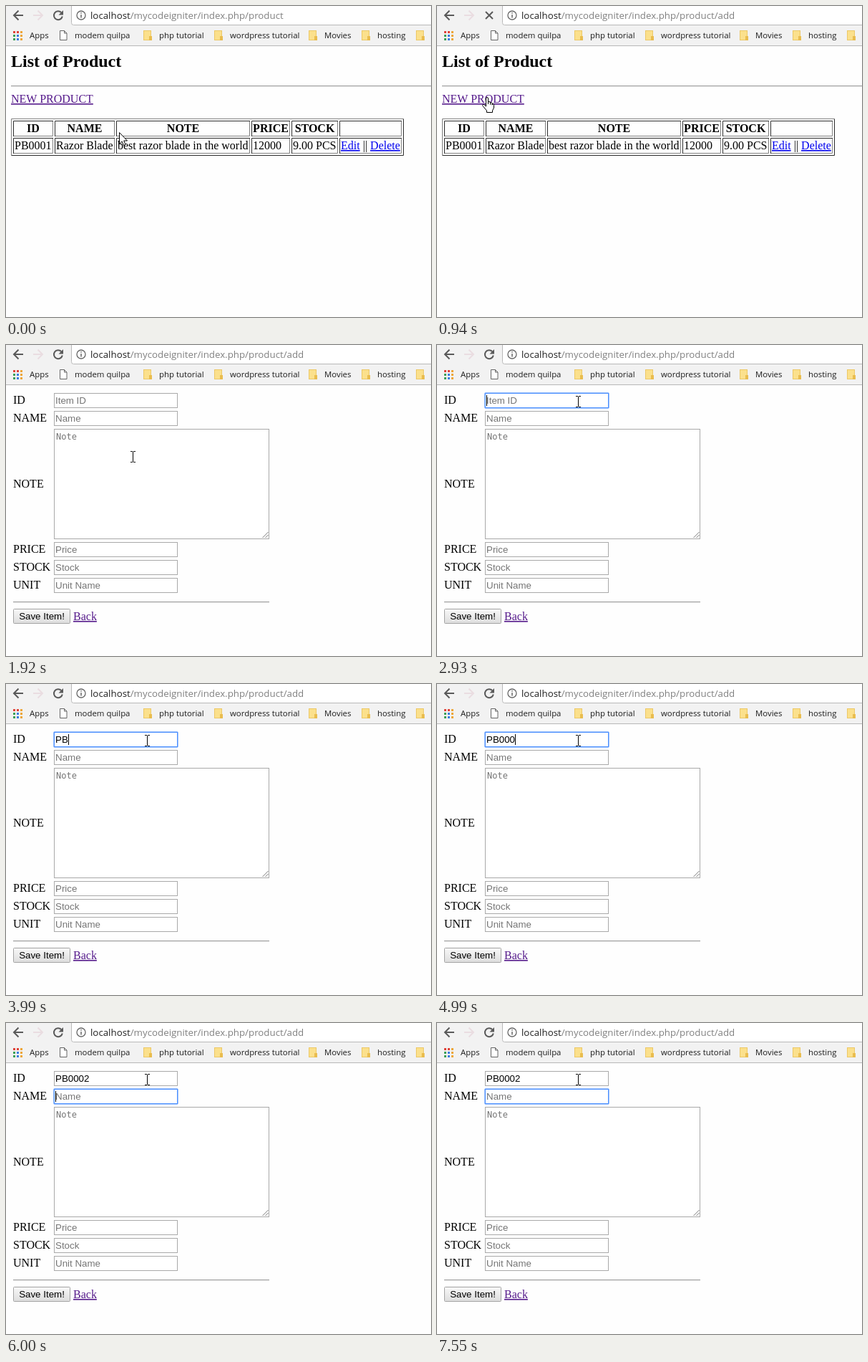
An HTML page that plays this animation: 594 by 434 pixels, repeating every 8000 ms.

```html
<!DOCTYPE html>
<html lang="en">
<head>
<meta charset="utf-8">
<title>Product list</title>
<style>
  html, body { margin: 0; width: 100%; height: 100%; overflow: hidden; background: #fefefe; }
  svg { display: block; width: 594px; height: 434px; }
  text { white-space: pre; }
  .ui { font: 11.4px "Open Sans", "Noto Sans", sans-serif; fill: #1c1c1c; }
  .url { font-size: 13.3px; fill: #222; }
  .path { fill: #808080; }
  .page { font: 16px "Liberation Serif", "Times New Roman", serif; fill: #000; }
  .head { font-weight: bold; text-anchor: middle; }
  .title { font-size: 24px; font-weight: bold; }
  .field { font: 13.333px "Liberation Sans", Arial, sans-serif; fill: #000; }
  .hint { fill: #757575; }
  .mono { font: 12px "DejaVu Sans Mono", monospace; }
  .link { fill: #00e; text-decoration: underline; }
  .seen { fill: #551a8b; text-decoration: underline; }
  .icon { fill: none; stroke: #5a5a5a; stroke-width: 2; }
</style>
</head>
<body>
<svg id="stage" viewBox="0 0 594 434">
  <rect width="594" height="434" fill="#fefefe"/>
  <g id="browser">
    <rect width="594" height="55" fill="#f2f2f2"/>
    <rect x="91.5" y="-4.5" width="520" height="31" rx="3" fill="#fff" stroke="#b9b9b9"/>
    <rect y="55" width="594" height="1" fill="#b8b8b8"/>
    <path class="icon" d="M24 13H11.5M17.5 6.5L11 13l6.5 6.5"/>
    <path class="icon" style="stroke:#eadde1" d="M38 13H50.5M44.500 6.500L51 13l-6.500 6.500"/>
    <g id="reload">
      <path class="icon" d="M77.300 9A6 6 0 1 0 78.800 14.500"/>
      <path d="M80 6v6.500h-6.500z" fill="#5a5a5a"/>
    </g>
    <path id="stop" class="icon" d="M68 8l10 10M78 8L68 18"/>
    <circle cx="105" cy="13" r="6" fill="none" stroke="#666" stroke-width="1.3"/>
    <path d="M105 12v4.500M105 9v1.600" stroke="#666" stroke-width="1.500"/>
    <text class="ui url" x="118" y="18">localhost<tspan id="path" class="path"></tspan></text>
    <path d="M75.500 34.500h6l3.500 3.500v9.500h-9.500zM81.500 34.500v3.500h3.500" fill="#fff" stroke="#666"/>
  </g>
  <g id="list" class="page"></g>
  <g id="form" class="page"></g>
  <g id="cursors" stroke="#000" fill="#fff">
    <path id="arrow" d="M.5.6V16.500L4.100 13l2.500 5.500 2.500-1.100L6.700 12h4.800z"/>
    <path id="hand" d="M5.500 13V2Q5.500.5 7 .5T8.500 2V10 7.500q0-1.100 1.500-1t1.500 1.500v2.500-2q0-1 1.300-.9t1.300 1.500v2-1q0-.7 1-.6 1.400.2 1.400 1.700V15l-2 4v2.500h-8V19L1 12.500q-.9-1.500.3-2.100 1.300-.5 2.800 1.300z"/>
    <path id="beam" fill="none" d="M0 .5h3M4 .5h3M3.500 1v14M0 15.500h3M4 15.500h3"/>
  </g>
</svg>
<script>
const $ = id => document.getElementById(id);
const LOOP = 8000;

const rect = (x, y, w, h, fill) =>
  `<rect x="${x}" y="${y}" width="${w}" height="${h}" fill="${fill}"/>`;
const frame = (x, y, w, h, fill, stroke) =>
  `<rect x="${x + .5}" y="${y + .5}" width="${w - 1}" height="${h - 1}" fill="${fill}" stroke="${stroke}"/>`;
const text = (x, y, str, cls = "") => `<text x="${x}" y="${y}" class="${cls}">${str}</text>`;
const add = (id, markup) => $(id).insertAdjacentHTML("beforeend", markup);
const show = (id, on) => $(id).setAttribute("visibility", on ? "visible" : "hidden");

// A box whose top/left and bottom/right edges differ in shade
function bevel(x, y, w, h, lit, shade) {
  const r = x + w - .5, b = y + h - .5;
  return `<g fill="none"><path stroke="${shade}" d="M${x} ${b}H${r}V${y}"/>` +
    `<path stroke="${lit}" d="M${x + .5} ${y + h}V${y + .5}H${x + w}"/></g>`;
}

const rule = (x, y, w) => rect(x, y, w, 1, "#9a9a9a") + rect(x, y + 1, w, 1, "#eee");

function drawBookmarks() {
  const dots = ["#e0433a", "#e0433a", "#eda63a", "#3c9f56", "#3d7de0", "#eda63a", "#3c9f56", "#3d7de0", "#eda63a"];
  dots.forEach((c, i) => add("browser", rect(10 + i % 3 * 5, 35 + Math.floor(i / 3) * 5, 3, 3, c)));
  add("browser", text(33, 45, "Apps", "ui") + text(96, 45, "modem quilpa", "ui"));
  const folders = [[192, "php tutorial"], [291, "wordpress tutorial"], [423, "Movies"], [497, "hosting"], [573, ""]];
  for (const [x, name] of folders) {
    add("browser", frame(x, 34, 11, 14, "#fbe08c", "#ecc867") +
      rect(x + 8, 42, 4, 6, "#e9bd4f") + text(x + 22, 45, name, "ui"));
  }
}

function drawList() {
  const dark = "#2c2c2c", gray = "#808080";
  add("list", text(7, 85, "List of Product", "title") + rule(7, 111, 587) +
    text(7, 135, "NEW PRODUCT", "seen") + bevel(7, 157, 549, 52, gray, dark));
  const columns = [
    [10, 56, "ID", "PB0001"],
    [68, 84, "NAME", "Razor Blade"],
    [154, 187, "NOTE", "best razor blade in the world"],
    [343, 54, "PRICE", "12000"],
    [399, 65, "STOCK", "9.00 PCS"],
    [466, 87, "", '<tspan class="link">Edit</tspan> || <tspan class="link">Delete</tspan>']
  ];
  for (const [x, w, head, value] of columns) {
    add("list", bevel(x, 160, w, 22, dark, gray) + bevel(x, 184, w, 22, dark, gray) +
      text(x + w / 2, 176, head, "head") + text(x + 2, 200, value));
  }
}

function drawForm() {
  const rows = [[67, "ID", "Item ID"], [92, "NAME", "Name"], [275, "PRICE", "Price"],
    [300, "STOCK", "Stock"], [325, "UNIT", "Unit Name"]];
  for (const [y, label, hint] of rows) {
    add("form", text(10, y + 15, label) + frame(67, y, 173, 21, "#fff", "#a9a9a9") +
      `<text id="in${label}" x="69" y="${y + 15}" class="field hint">${hint}</text>`);
  }
  add("form", text(10, 199, "NOTE") + frame(67, 117, 301, 154, "#fff", "#a9a9a9") +
    text(70, 132, "Note", "mono hint") +
    '<path d="M358.500 269l8-8M362.500 269l4-4" stroke="#777" fill="none"/>' + rule(10, 358, 358) +
    '<linearGradient id="face" x2="0" y2="1"><stop stop-color="#f8f8f8"/><stop offset="1" stop-color="#ddd"/></linearGradient>' +
    '<rect x="10.500" y="368.500" width="79" height="20" rx="1" fill="url(#face)" stroke="#a3a3a3"/>' +
    '<text x="50" y="383" class="field" text-anchor="middle">Save Item!</text>' +
    text(94, 384, "Back", "seen") +
    '<g id="focus" fill="none" stroke="#4d90fe"><rect x="66.500" y="66.500" width="174" height="22" rx="1.500" opacity=".55"/>' +
    '<rect x="67.500" y="67.500" width="172" height="20"/></g>' +
    '<rect id="caret" width="1" height="15"/>');
}

// Each step overrides part of the state from its start time on
const steps = [
  { at: 0, page: "list", route: "", cursor: ["arrow", 158, 176], loading: false, focus: 0, caret: 0, id: "" },
  { at: 500, cursor: ["hand", 59, 123] },
  { at: 940, cursor: ["hand", 63, 127], route: "/add", loading: true },
  { at: 1440, cursor: ["hand", 165, 158], loading: false },
  { at: 1920, page: "form", cursor: ["beam", 174, 148] },
  { at: 2450, cursor: ["arrow", 188, 91] },
  { at: 2930, cursor: ["beam", 194, 71], focus: 67, caret: 69 },
  { at: 3460, caret: 0 },
  { at: 3990, id: "PB", caret: 87 },
  { at: 4470, caret: 0 },
  { at: 4990, id: "PB000", caret: 109 },
  { at: 5490, caret: 0 },
  { at: 6000, id: "PB0002", focus: 92, caret: 69 },
  { at: 6500, caret: 0 },
  { at: 7020, caret: 69 },
  { at: 7550, caret: 0 }
];

function render(t) {
  const s = Object.assign({}, ...steps.filter(step => step.at <= t));
  for (const page of ["list", "form"]) $(page).style.display = s.page === page ? "" : "none";
  $("path").textContent = "/mycodeigniter/index.php/product" + s.route;
  show("reload", !s.loading);
  show("stop", s.loading);

  const input = $("inID");
  input.textContent = s.id || "Item ID";
  input.classList.toggle("hint", !s.id);
  show("focus", s.focus > 0);
  $("focus").setAttribute("transform", `translate(0 ${s.focus - 67})`);
  show("caret", s.caret > 0);
  $("caret").setAttribute("x", s.caret);
  $("caret").setAttribute("y", s.focus + 3);

  const [kind, x, y] = s.cursor;
  for (const name of ["arrow", "hand", "beam"]) show(name, name === kind);
  $(kind).setAttribute("transform", `translate(${x} ${y})`);
}

drawBookmarks();
drawList();
drawForm();

const start = performance.now();
function tick() {
  render((performance.now() - start) % LOOP);
  requestAnimationFrame(tick);
}
tick();
</script>
</body>
</html>
```
